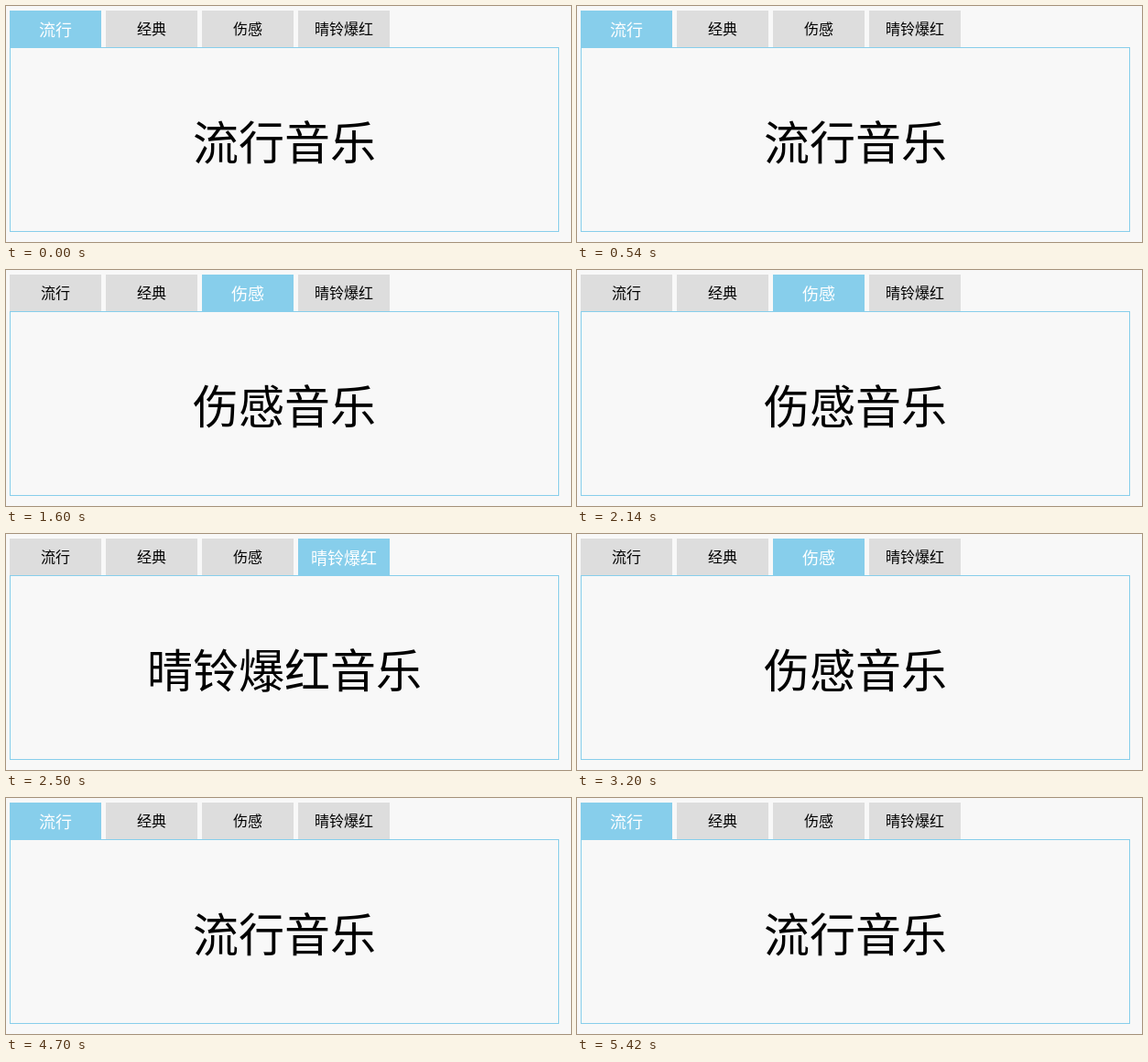
Recreate the animation shown at these times as an HTML page. Size 617x258 px, loop 5.9 s.

```html
<!DOCTYPE html>
<html lang="zh-CN">
<head>
<meta charset="utf-8">
<title>音乐标签页</title>
<style>
  html, body {
    margin: 0;
    width: 100%;
    height: 100%;
    overflow: hidden;
    background: #f8f8f8;
  }
  body {
    position: relative;
    font-family: "Microsoft YaHei", "Noto Sans CJK SC", "Noto Sans CJK", sans-serif;
    color: #000;
    text-align: center;
    white-space: nowrap;
  }
  .tab {
    position: absolute;
    top: 5px;
    width: 100px;
    height: 40px;
    font-size: 16px;
    line-height: 38px;
    background: #ddd;
  }
  .tab.on {
    font-size: 18px;
    line-height: 40px;
    color: #fff;
    background: skyblue;
  }
  #panel {
    position: absolute;
    left: 4px;
    top: 45px;
    width: 598px;
    height: 200px;
    font-size: 50px;
    line-height: 200px;
    border: 1px solid skyblue;
  }
</style>
</head>
<body>
<div id="panel"></div>
<script>
  const labels = ["流行", "经典", "伤感", "晴铃爆红"];
  // [start in ms, active tab]
  const steps = [[0, 0], [900, 1], [1600, 2], [2500, 3], [3200, 2], [3800, 1], [4700, 0]];
  const loop = 5900;

  const panel = document.getElementById("panel");
  const tabs = labels.map((label, i) => {
    const tab = document.createElement("div");
    tab.className = "tab";
    tab.style.left = 4 + i * 105 + "px";
    tab.textContent = label;
    document.body.append(tab);
    return tab;
  });

  let active = -1;
  function select(index) {
    if (index === active) return;
    active = index;
    tabs.forEach((tab, i) => tab.classList.toggle("on", i === index));
    panel.textContent = labels[index] + "音乐";
  }

  const start = performance.now();
  function tick() {
    const t = (performance.now() - start) % loop;
    select(steps.findLast(([at]) => at <= t)[1]);
    requestAnimationFrame(tick);
  }
  tick();
</script>
</body>
</html>
```
